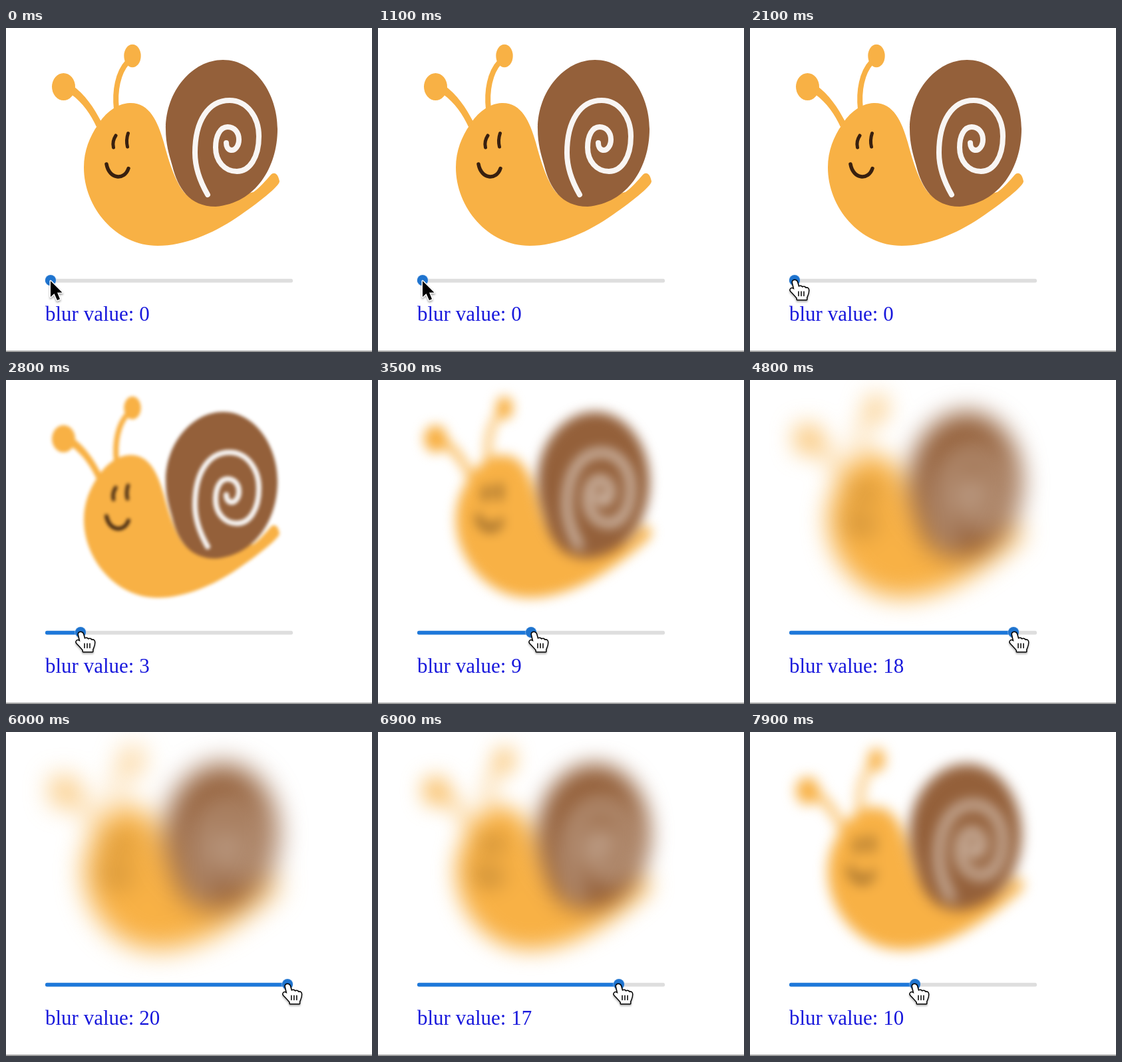
Animation, 550 px wide and 488 px high, one loop 8 s. Source, as an HTML page with a canvas:

```html
<!DOCTYPE html>
<html lang="en">
<head>
<meta charset="utf-8">
<title>Blur slider</title>
<style>
html, body { margin: 0; width: 100%; height: 100%; overflow: hidden; background: #fff; }
canvas { display: block; }
</style>
</head>
<body>
<canvas id="stage" width="550" height="488"></canvas>
<script>
const W = 550, H = 488, LOOP = 8000, STEP = 100;
const MIN_X = 67, MAX_X = 423, MAX_BLUR = 20, TRACK_Y = 380.5;
const YELLOW = '#f8b145', BROWN = '#94603a', CREAM = '#f8f5f3', DARK = '#38200f', BLUE = '#1d78da';

// [time, x] for the thumb and [time, offset] for the pointer relative to it
const THUMB = [[2500, 67], [2600, 76], [2800, 112], [3500, 230], [4300, 335], [4800, 396],
  [5100, 423], [6200, 423], [6400, 411], [6900, 362], [7900, 248]];
const LEAD = [[2800, 0], [3500, 4], [4800, 1], [6900, -1]];
const PRESS_AT = 1800;

const ctx = document.getElementById('stage').getContext('2d');

function track(keys, t) {
  if (t <= keys[0][0]) return keys[0][1];
  for (let i = 1; i < keys.length; i++) {
    const [t0, a] = keys[i - 1], [t1, b] = keys[i];
    if (t <= t1) return a + (b - a) * (t - t0) / (t1 - t0);
  }
  return keys[keys.length - 1][1];
}

function fill(c, color, d) {
  c.fillStyle = color;
  c.fill(new Path2D(d));
}

function stroke(c, color, width, d) {
  c.strokeStyle = color;
  c.lineWidth = width;
  c.lineCap = c.lineJoin = 'round';
  c.stroke(new Path2D(d));
}

function oval(c, color, x, y, rx, ry) {
  c.fillStyle = color;
  c.beginPath();
  c.ellipse(x, y, rx, ry, 0, 0, Math.PI * 2);
  c.fill();
}

function makeSnail() {
  const layer = document.createElement('canvas');
  layer.width = W;
  layer.height = H;
  const c = layer.getContext('2d');
  // antennae
  oval(c, YELLOW, 86.5, 88.5, 17.5, 20.5);
  oval(c, YELLOW, 190, 42, 12.7, 17.3);
  fill(c, YELLOW, 'M99 86C119 100 132 120 143 141L136 149C128 131 115 112 98 100Z');
  stroke(c, YELLOW, 8, 'M183 51C168 67 163 95 166 122');
  // body
  fill(c, YELLOW, 'M138 146C149 128 166 114 186 113C215 112 228 140 237 172C246 206 256 235 270 250' +
    'L320 260L372 247C382 240 390 230 398 221C403 216 409 219 411 231C411 238 380 263 346 286' +
    'C310 310 268 328 228 328C165 328 117 270 117 210C117 185 126 163 138 146Z');
  // shell
  fill(c, BROWN, 'M326 48C375 48 408 100 408 152C408 210 375 264 315 269C275 269 258 240 250 208' +
    'C245 190 240 175 240 152C240 95 280 48 326 48Z');
  stroke(c, CREAM, 8, 'M303 251C288 225 284 205 284 188C284 140 304 109 336 109C362 109 380 134 380 163' +
    'C380 195 366 216 347 216C328 216 315 200 315 180C315 162 322 149 333 149' +
    'C343 149 350 157 350 168C350 178 344 185 338 184C333 183 331 178 331 173');
  // face
  stroke(c, DARK, 5, 'M165 162C161 168 160 174 161.5 180M183.5 158.5C181 166 181 173 182.5 179');
  stroke(c, DARK, 5.5, 'M151 205C155 228 178 230 184 211.5');
  return layer;
}

function drawSlider(x) {
  const bar = (from, to, color) => {
    ctx.fillStyle = color;
    ctx.beginPath();
    ctx.roundRect(from, TRACK_Y - 2.7, to - from, 5.6, 2.5);
    ctx.fill();
  };
  bar(59, 431, '#dedede');
  bar(59, x, BLUE);
  oval(ctx, 'rgba(190,215,245,.45)', x, TRACK_Y - 0.5, 9, 9);
  oval(ctx, '#1f74cf', x, TRACK_Y - 0.5, 8, 8);
}

function outlined(d, color, edge, width) {
  ctx.save();
  ctx.shadowColor = 'rgba(0,0,0,.35)';
  ctx.shadowBlur = 3;
  ctx.shadowOffsetY = 2;
  stroke(ctx, edge, width, d);
  ctx.restore();
  fill(ctx, color, d);
}

function drawPointer(x, y, pressed) {
  ctx.save();
  ctx.translate(x, y);
  if (pressed) {
    outlined('M-4 3C-4-1 2-1 3 3L5 10C7 8 10 9 10.5 11C12 9 15 10 15.5 12C18 11 20 12 20 15' +
      'C20 20 18 23 17 26L17 29L3 29L3 27C0 23-3 20-6 17C-9 14-6 11-3 13L-1.5 14Z', '#fff', '#000', 3);
    stroke(ctx, '#000', 1.5, 'M5 17V23.5M9 17V23.5M13 17V23.5');
  } else {
    outlined('M0 1V25L5.5 20L10 30L14 28.3L10 18.5H17.5Z', '#000', '#fff', 3);
  }
  ctx.restore();
}

const snail = makeSnail();

function draw(t) {
  const x = track(THUMB, t);
  const value = (x - MIN_X) / (MAX_X - MIN_X) * MAX_BLUR;
  ctx.fillStyle = '#fff';
  ctx.fillRect(0, 0, W, H);
  ctx.filter = value > 0 ? `blur(${value}px)` : 'none';
  ctx.drawImage(snail, 0, 0);
  ctx.filter = 'none';

  ctx.fillStyle = '#8b8b8b';
  ctx.fillRect(0, 486, W, 1.7);
  drawSlider(x);
  ctx.fillStyle = '#1818dc';
  ctx.font = '31px "Liberation Serif", Times, serif';
  ctx.fillText('blur value: ' + Math.round(value), 59, 441);

  const pressed = t >= PRESS_AT;
  drawPointer(x + (pressed ? 1 + track(LEAD, t) : 0), 380, pressed);
}

const start = performance.now();
function tick() {
  const t = (performance.now() - start) % LOOP;
  draw(Math.floor(t / STEP) * STEP);
  requestAnimationFrame(tick);
}
tick();
</script>
</body>
</html>
```
